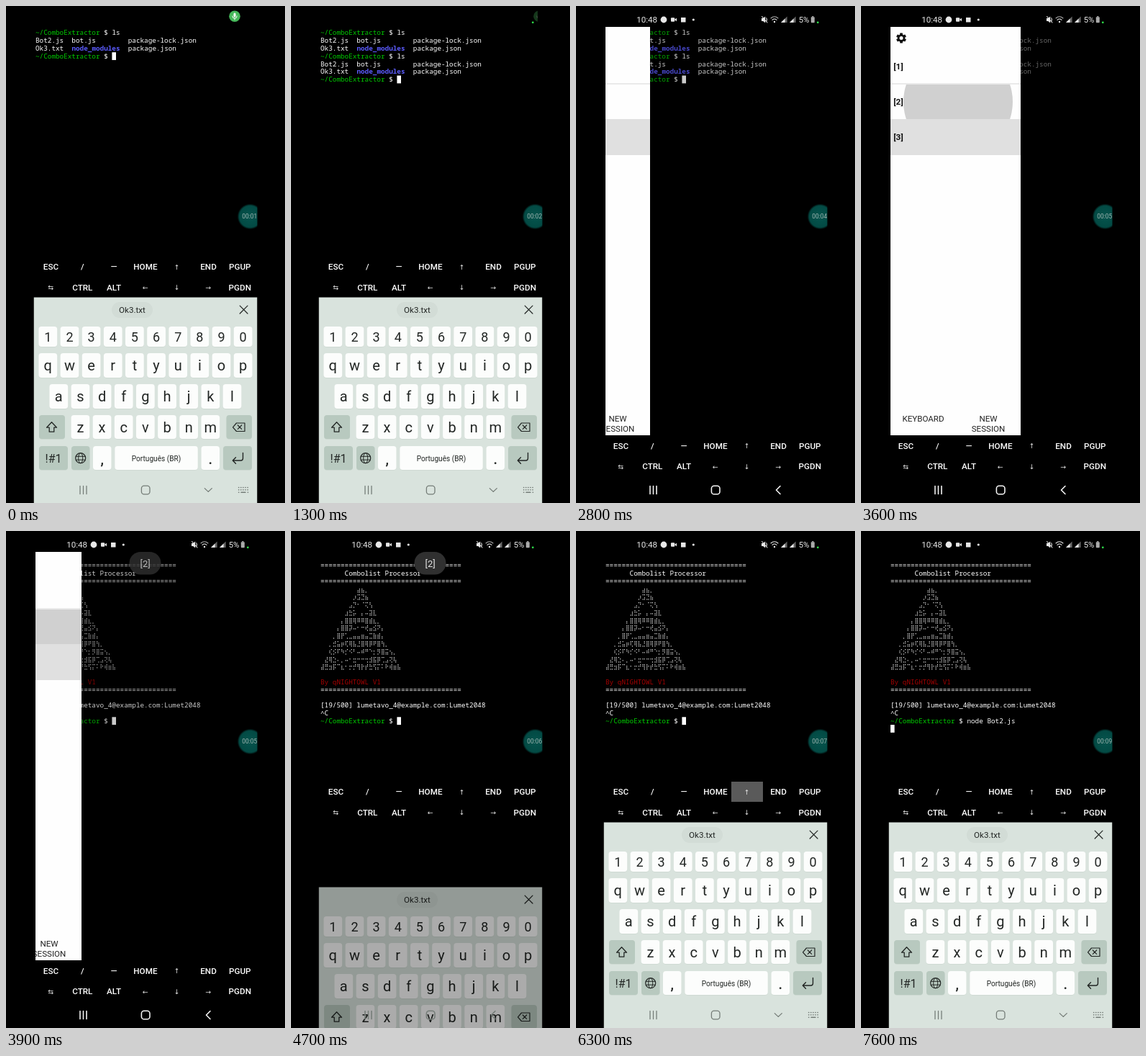
An HTML page that plays this animation: 388x690 px, repeating every 8 s.

```html
<!DOCTYPE html>
<html lang="en">
<head>
<meta charset="utf-8">
<title>Terminal session</title>
<style>
html, body { margin: 0; width: 100%; height: 100%; overflow: hidden; background: #000; }
svg { display: block; width: 100vw; height: 100vh; }
text { white-space: pre; font-family: Roboto, "Noto Sans", sans-serif; }
.mono { font-family: "Noto Sans Mono", "DejaVu Sans Mono", monospace; font-size: 9.333px; }
.dots { font-family: "DejaVu Sans", sans-serif; font-size: 7.65px; fill: #fff; }
.sym { font-family: "DejaVu Sans", sans-serif; }
</style>
</head>
<body>
<svg id="stage" viewBox="0 0 388 690">
  <defs>
    <radialGradient id="teal">
      <stop offset="0" stop-color="#04544d"/><stop offset=".84" stop-color="#034a44"/>
      <stop offset="1" stop-color="#034a44" stop-opacity="0"/>
    </radialGradient>
    <clipPath id="screen"><rect x="38.5" y="0" width="311" height="690"/></clipPath>
    <clipPath id="page"><rect x="41" y="29" width="308" height="567"/></clipPath>
    <clipPath id="row"><rect x="41" y="109" width="181" height="48"/></clipPath>
    <clipPath id="top"><rect x="0" y="0" width="343" height="40"/></clipPath>
  </defs>
</svg>
<script>
const LOOP = 8000, STEP = 100;
const COL = 5.6, LINE = 10.78, LEFT = 41, BASE = 40.4;
const GREEN = '#00cd00', BLUE = '#5c5cff', RED = '#a80000', WHITE = '#fff';
const INK = '#222624', FN = '#b8c9bf', KEY = '#fcfdfc', DOWN = '#cbd6cf', ICON = '#e8e8e8';
const stage = document.getElementById('stage');

function add(parent, tag, attrs = {}, content) {
  const el = document.createElementNS('http://www.w3.org/2000/svg', tag);
  for (const k in attrs) el.setAttribute(k, attrs[k]);
  if (content !== undefined) el.textContent = content;
  parent.append(el);
  return el;
}
const group = (parent, attrs) => add(parent, 'g', attrs);
const box = (p, x, y, w, h, fill, rx = 0) => add(p, 'rect', { x, y, width: w, height: h, fill, rx });
const disc = (p, cx, cy, r, fill) => add(p, 'circle', { cx, cy, r, fill });
const line = (p, d, stroke, w = 1.2) => add(p, 'path', {
  d, stroke, 'stroke-width': w, fill: 'none', 'stroke-linecap': 'round', 'stroke-linejoin': 'round' });
const label = (p, s, x, y, size, fill, weight = 400, cls = '') => add(p, 'text', {
  x, y: y + size * 0.36, fill, 'font-size': size, 'font-weight': weight, 'text-anchor': 'middle', class: cls }, s);
const show = (el, on) => el.setAttribute('visibility', on ? 'visible' : 'hidden');
const at = (table, t) => table.reduce((cur, row) => row[0] <= t ? row : cur);
const mono = (p, row, col, s, fill = WHITE, weight = 400) => add(p, 'text', {
  x: LEFT + col * COL, y: BASE + row * LINE, fill, class: 'mono', 'font-weight': weight }, s);

// Terminal
const screen = group(stage, { 'clip-path': 'url(#screen)' });
const term = group(screen);
function prompt(p, row) {
  mono(p, row, 0, '~/ComboExtractor', GREEN);
  mono(p, row, 17, '$');
}
function listing(p, row) {
  mono(p, row, 19, 'ls');
  mono(p, row + 1, 0, 'Bot2.js  bot.js        package-lock.json');
  mono(p, row + 2, 0, 'Ok3.txt');
  mono(p, row + 2, 9, 'node_modules', BLUE, 700);
  mono(p, row + 2, 23, 'package.json');
  prompt(p, row + 3);
}
const first = group(term);
prompt(first, 0);
listing(first, 0);
const again = group(term);
listing(again, 3);

const second = group(term);
const rule = '='.repeat(35);
[1, 3, 17].forEach(r => mono(second, r, 0, rule));
mono(second, 2, 6, 'Combolist Processor');
[[9, '⣴⣦⡀'], [8, '⡰⣩⣙⣦'], [7, '⣠⡙⠂⠈⢍⢣'], [6, '⣰⣓⡥⠀⡄⠤⣽⣇'],
 [5, '⡄⣿⣿⢿⠿⠿⣿⣾⣆⡀'], [4, '⡄⣿⣿⡽⠤⠂⠒⢞⣤⣪⠝⡄'], [3, '⡀⣿⡟⢁⣀⣤⣤⣶⣤⣉⣷⣾⡄'],
 [2, '⡀⣚⣥⡶⢏⢿⣧⣘⣿⢿⡿⠟⣿⢳⡀'], [2, '⢎⡪⠏⠳⡊⠪⠃⠤⠾⠛⠑⡂⡻⣿⣭⢢⡀'],
 [1, '⣜⢿⣑⠄⡀⠤⠂⣒⠒⠒⢒⣺⣯⡿⢉⣠⢝⢧'], [0, '⣼⣛⣲⡯⠉⣆⠂⡒⡚⢻⡗⡞⣓⢫⡍⠅⠗⢾⣶⣧']
].forEach(([col, s], i) => add(second, 'text', {
  x: LEFT + col * COL, y: BASE + (i + 4) * LINE, class: 'dots' }, s));
mono(second, 16, 0, 'By qNIGHTOWL V1', RED);
mono(second, 19, 0, '[19/500] lumetavo_4@example.com:Lumet2048');
mono(second, 20, 0, '^C');
prompt(second, 21);
const typed = mono(term, 0, 19, '');
const cursor = box(term, 0, 0, COL, 10.8, WHITE);

// Session drawer
const drawerClip = group(screen, { 'clip-path': 'url(#page)' });
const drawer = group(drawerClip);
box(drawer, 41, 29, 181, 567, '#fefefe');
const gear = group(drawer, { transform: 'translate(56 44.5)' });
for (let a = 0; a < 360; a += 60) {
  const tooth = box(gear, -1.9, -7, 3.8, 4, '#111', 0.6);
  tooth.setAttribute('transform', `rotate(${a})`);
}
disc(gear, 0, 0, 5.2, '#111');
disc(gear, 0, 0, 2.5, '#fefefe');
box(drawer, 41, 107.5, 181, 1, '#d8d8d8');
box(drawer, 41, 157, 181, 50, '#e0e0e0');
const rippleClip = group(drawer, { 'clip-path': 'url(#row)' });
const ripple = disc(rippleClip, 135, 133, 0, '#d0d0d0');
['[1]', '[2]', '[3]'].forEach((s, i) => label(drawer, s, 52, 84 + i * 49, 11.8, '#111', 700));
[['KEYBOARD', 86.5, 573], ['NEW', 177, 573], ['SESSION', 177, 586.5]]
  .forEach(([s, x, y]) => label(drawer, s, x, y, 11.6, '#222'));

// Extra key rows
const extra = group(screen);
const extraKeys = [['ESC', '/', '—', 'HOME', '↑', 'END', 'PGUP'], ['⇆', 'CTRL', 'ALT', '←', '↓', '→', 'PGDN']];
const upKey = box(extra, 216, 348, 44, 28, '#5a5a5a');
extraKeys.forEach((row, r) => row.forEach((s, i) => {
  const x = 62.5 + i * 43.8, y = 361.7 + r * 28.7;
  if (/[←-⇿]/.test(s)) label(extra, s, x, y + 0.6, 9.4, '#e4e4e4', 400, 'sym');
  else label(extra, s, x, y, 11.7, WHITE, 500);
}));

// Soft keyboard
const board = group(screen);
const keys = {};
box(board, 38.5, 404.5, 311, 300, '#d9e3dd');
box(board, 147, 411, 57, 22, '#d2dcd6', 11);
label(board, 'Ok3.txt', 175.5, 422, 11.6, INK);
line(board, 'M325.2 416.2l10.8 10.8m0-10.8l-10.8 10.8', INK, 1.2);
function key(name, x, y, w, h, fill = KEY) {
  box(board, x, y + 0.8, w, h, '#cdd8d1', 4);
  keys[name] = { el: box(board, x, y, w, h, fill, 4), fill };
}
[['1234567890', 58.3, 445, 28, 18], ['qwertyuiop', 58.3, 482, 34, 20],
 ['asdfghjkl', 73.3, 525, 34, 20], ['zxcvbnm', 103.4, 568, 33, 20]
].forEach(([chars, x0, y, h, size]) => [...chars].forEach((c, i) => {
  const x = x0 + i * 30.15;
  key(c, x - 12.9, y, 25.8, h);
  label(board, c, x, y + h / 2 + (size > 18 ? 0 : 0.4), size, INK);
}));
key('shift', 46, 568, 36, 33, FN);
line(board, 'M63.5 577.8l7 7.4h-3.7v6h-6.6v-6h-3.7z', INK, 1.3);
key('del', 306.5, 568, 35.5, 33, FN);
line(board, 'M320.5 579h11.5v11.5h-11.5l-5-5.7zM322.3 582l5.4 5.4m0-5.4l-5.4 5.4', INK, 1.2);
key('sym', 46, 611, 40, 33, FN);
label(board, '!#1', 66, 628, 16, INK);
key('lang', 91, 611, 25.5, 33, FN);
add(board, 'circle', { cx: 103.7, cy: 627.7, r: 7, fill: 'none', stroke: INK, 'stroke-width': 1.2 });
add(board, 'ellipse', { cx: 103.7, cy: 627.7, rx: 3, ry: 7, fill: 'none', stroke: INK });
line(board, 'M97.5 625.3h12.4M97.5 630.1h12.4', INK, 1);
key('comma', 121, 611, 25.5, 33);
label(board, ',', 133.8, 629, 20, INK, 500);
key('space', 151.3, 611, 115.5, 33);
label(board, 'Português (BR)', 209, 628, 10.1, INK);
key('dot', 271.5, 611, 25.5, 33);
label(board, '.', 284.3, 629, 20, INK, 500);
key('enter', 302, 611, 40, 33, FN);
line(board, 'M329.5 620.5v7.5q0 3-3 3h-11m4-4.2l-4.2 4.2l4.2 4.2', INK, 1.4);

// Navigation bar
const nav = group(screen, { fill: 'none', 'stroke-linecap': 'round', 'stroke-linejoin': 'round' });
add(nav, 'path', { d: 'M103 666.5v11M107.5 666.5v11M112 666.5v11' });
add(nav, 'rect', { x: 188.4, y: 666.2, width: 11.6, height: 11.6, rx: 3.6 });
const back = add(nav, 'path', { d: 'M284 666.5l-5.5 5.5l5.5 5.5' });
const hide = add(nav, 'path', { d: 'M276.3 669.6l5 4.8l5-4.8' });
const swap = group(nav, { 'stroke-width': 1.4 });
add(swap, 'path', { d: 'M323.5 668.5h13M323.5 671.7h13', 'stroke-dasharray': '0.4 2.7' });
add(swap, 'path', { d: 'M323.5 675.2h.4M327 675.2h6M336.2 675.2h.4' });

// Status bar
const status = group(screen);
label(status, '10:48', 98.7, 19.2, 11.6, ICON);
disc(status, 122, 19, 4.4, ICON);
box(status, 132, 16.2, 5.2, 5.6, ICON, 1);
add(status, 'path', { d: 'M137.4 18.4l2.6-1.7v4.6l-2.6-1.7z', fill: ICON });
box(status, 146, 16, 6.5, 6.5, ICON);
disc(status, 163.3, 19, 1.6, ICON);
add(status, 'path', { d: 'M258 17h2.2l3-2.6v9.2l-3-2.6h-2.2z', fill: ICON });
line(status, 'M258.5 14.5l7.5 8.5M264.8 16.8q1.3 2.2 0 4.4', ICON, 1.1);
const arc = line(status, 'M271 17q5-4.4 10 0', ICON, 1.1);
line(status, 'M273 19.3q3-2.6 6 0', ICON, 1.1);
disc(status, 276, 22, 1.2, ICON);
[285, 297].forEach(x => {
  add(status, 'path', { d: `M${x} 23l8.6-8.6v8.6z`, fill: '#666' });
  add(status, 'path', { d: `M${x} 23l5.6-5.6v5.6z`, fill: ICON });
});
label(status, '5%', 317, 19.2, 11.4, ICON);
box(status, 326.8, 15.2, 5, 8, '#aaa', 1);
box(status, 328.2, 14, 2.2, 1.4, '#aaa');

const privacy = disc(screen, 336.3, 22.8, 1.4, '#2fe04a');
const micClip = group(screen, { 'clip-path': 'url(#top)' });
const mic = group(micClip);
disc(mic, 318, 14.3, 7.8, '#45b85a');
box(mic, 316.5, 9.6, 3, 6, WHITE, 1.5);
line(mic, 'M314.8 14q0 3.2 3.2 3.2t3.2-3.2M318 17.4v1.6', WHITE, 1);

// Toast and recorder bubble
const toast = group(screen);
box(toast, 171.5, 29, 44, 31.5, '#303030', 15.7);
label(toast, '[2]', 193.6, 45, 13, '#e4e4e4');
disc(screen, 339.5, 292.3, 17.8, 'url(#teal)');
const clock = add(screen, 'text', { x: 328.3, y: 295.4, 'font-size': 8.4, fill: '#9fb3af' });

// Step tables: time first, then values
const lines = [[0, 3, ''], [100, 3, 'l'], [500, 3, 'ls'], [1200, 6, ''], [3700, 21, ''], [6400, 21, 'node Bot2.js']];
const presses = [['l', 100, 200], ['s', 500, 700], ['enter', 1100, 1200], ['enter', 7000, 7100]];
const boardSteps = [[0, 0, 1], [2000, 30, .86], [2100, 110, .45], [2200, 285, 0], [4700, 90, .68], [4800, 24, .9], [4900, 0, 1]];
const drawerSteps = [[0, 0], [2800, 62], [2900, 98], [3000, 132], [3100, 158], [3200, 174], [3300, 181],
  [3800, 140], [3900, 64], [4000, 16], [4100, 0]];
const rippleSteps = [[0, 0], [3500, 42], [3600, 76], [3700, 110]];
const toastSteps = [[0, 0], [3800, .4], [3900, .8], [4000, 1], [5700, .8], [5800, .5], [5900, .2], [6000, 0]];
const micSteps = [[0, 0, 1], [1200, 13, .75], [1300, 27, .3], [1400, 30, 0]];
const secondSteps = [0, 500, 1500, 2500, 3500, 4500, 5600, 6600, 7600];

function render(t) {
  const [, row, text] = at(lines, t);
  const entered = t >= 7000, inSecond = t >= 3700;
  show(first, !inSecond);
  show(again, !inSecond && t >= 1200);
  show(second, inSecond);
  typed.textContent = text;
  typed.setAttribute('y', BASE + row * LINE);
  cursor.setAttribute('x', LEFT + (entered ? 0 : 19 + text.length) * COL);
  cursor.setAttribute('y', BASE - 8.5 + (row + (entered ? 1 : 0)) * LINE);

  const open = at(drawerSteps, t)[1];
  drawer.setAttribute('transform', `translate(${open - 181} 0)`);
  show(drawer, open > 0);
  term.setAttribute('opacity', 1 - 0.6 * open / 181);
  ripple.setAttribute('r', at(rippleSteps, t)[1]);

  const [, dy, alpha] = at(boardSteps, t);
  board.setAttribute('transform', `translate(0 ${dy})`);
  board.setAttribute('opacity', alpha);
  const hidden = t >= 2000 && t < 4700;
  extra.setAttribute('transform', `translate(0 ${hidden ? 248.7 : 0})`);
  show(upKey, t >= 6300 && t < 6400);
  for (const k in keys) {
    const down = presses.some(([name, from, to]) => name === k && t >= from && t < to);
    keys[k].el.setAttribute('fill', down ? (keys[k].fill === FN ? '#9fb3a7' : DOWN) : keys[k].fill);
  }

  const plain = t >= 2000 && t < 4800;
  nav.setAttribute('stroke', t >= 2000 && t < 4300 ? '#f4f4f4' : '#757d78');
  nav.setAttribute('stroke-width', plain ? 1.6 : 1.3);
  show(back, plain);
  show(hide, !plain);
  show(swap, !plain);

  show(status, t >= 2000);
  arc.setAttribute('opacity', t >= 5200 ? 1 : 0.75);
  show(privacy, t >= 1200);
  const [, dx, glow] = at(micSteps, t);
  mic.setAttribute('transform', `translate(${dx} 0)`);
  mic.setAttribute('opacity', glow);
  toast.setAttribute('opacity', at(toastSteps, t)[1]);
  clock.textContent = '00:0' + secondSteps.filter(s => s <= t).length;
}

const start = performance.now();
function tick() {
  const t = (performance.now() - start) % LOOP;
  render(Math.floor(t / STEP) * STEP);
  requestAnimationFrame(tick);
}
tick();
</script>
</body>
</html>
```
